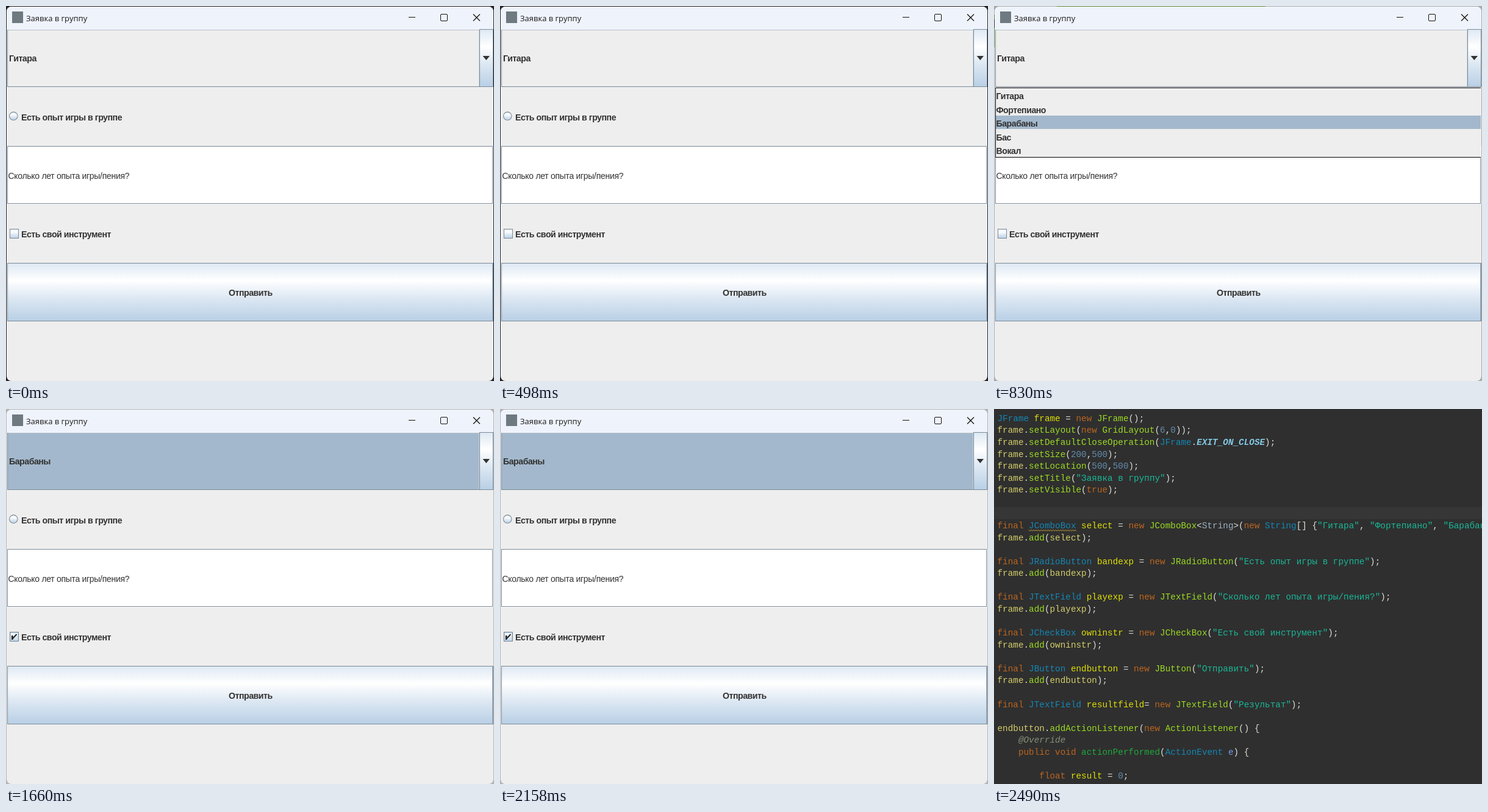
An HTML page with a canvas for the animation above (3.32 s loop, 800 by 616 pixels).

```html
<!DOCTYPE html>
<html lang="ru">
<head>
<meta charset="utf-8">
<style>
  html, body { margin: 0; width: 800px; height: 616px; overflow: hidden; background: #2f2f2f; }
  canvas { display: block; }
</style>
</head>
<body>
<canvas id="stage" width="800" height="616"></canvas>
<script>
const ctx = document.getElementById('stage').getContext('2d');
const STEP = 830;
const BORDER = '#7a8a99', PANEL = '#eeeeee', SELECTED = '#a3b8cc', INK = '#333333';
const BOLD = 'bold 14.2px "Liberation Sans", Arial, sans-serif';
const PLAIN = '14px "Liberation Sans", Arial, sans-serif';
const instruments = ['Гитара', 'Фортепиано', 'Барабаны', 'Бас', 'Вокал'];

function rect(x, y, w, h, fill) {
  ctx.fillStyle = fill;
  ctx.fillRect(x, y, w, h);
}

function outline(x, y, w, h, color) {
  ctx.strokeStyle = color;
  ctx.lineWidth = 1;
  ctx.strokeRect(x + .5, y + .5, w - 1, h - 1);
}

function text(str, x, y, font, color, spacing = 0) {
  ctx.font = font;
  ctx.letterSpacing = spacing + 'px';
  ctx.fillStyle = color;
  ctx.fillText(str, x, y);
}

function label(str, x, y) {
  text(str, x, y, BOLD, INK, -.5);
}

function path(points, color, width) {
  ctx.beginPath();
  points.forEach(([x, y]) => ctx.lineTo(x, y));
  ctx.strokeStyle = color;
  ctx.lineWidth = width;
  ctx.stroke();
}

function metal(y, h) {
  const g = ctx.createLinearGradient(0, y, 0, y + h);
  g.addColorStop(0, '#dde8f3');
  g.addColorStop(.3, '#ffffff');
  g.addColorStop(.6, '#dde8f3');
  g.addColorStop(1, '#b8cfe5');
  return g;
}

function metalBox(x, y, w, h) {
  rect(x, y, w, h, metal(y, h));
  outline(x, y, w, h, BORDER);
}

function desktop(scene) {
  rect(0, 0, 800, 616, ['#252326', '#a9a9a9', '#b4b4b4'][scene]);
  if (scene === 1) {
    rect(0, 14, 1, 54, '#5b8a3c');
    rect(0, 22, 1, 14, '#333333');
  }
}

function titleBar() {
  rect(0, 0, 800, 39, '#eff3fb');
  rect(10, 9, 18, 19, '#6f7a80');
  text('Заявка в группу', 33, 25, '13px "Open Sans", "Noto Sans", sans-serif', '#1a1a1a');
  path([[660, 18.5], [671, 18.5]], '#111', 1);
  ctx.beginPath();
  ctx.roundRect(712.5, 13.5, 11, 11, 1.5);
  ctx.stroke();
  path([[766, 13.5], [777, 24.5]], '#111', 1.2);
  path([[777, 13.5], [766, 24.5]], '#111', 1.2);
}

function comboBox(value, focused) {
  rect(2, 39, 774, 94, focused ? SELECTED : PANEL);
  rect(2, 39, 774, 1, '#b9c2ca');
  rect(2, 39, 1, 94, BORDER);
  rect(2, 132, 797, 1, BORDER);
  rect(775, 40, 1, 92, '#c9d3dc');
  metalBox(776, 38, 23, 95);
  ctx.beginPath();
  ctx.moveTo(781.5, 82);
  ctx.lineTo(793, 82);
  ctx.lineTo(787.3, 89);
  ctx.fillStyle = INK;
  ctx.fill();
  label(value, 5, 91);
}

function radioButton() {
  ctx.beginPath();
  ctx.arc(12.3, 180.8, 6.7, 0, Math.PI * 2);
  ctx.fillStyle = metal(174, 14);
  ctx.fill();
  ctx.strokeStyle = BORDER;
  ctx.lineWidth = 1.1;
  ctx.stroke();
  label('Есть опыт игры в группе', 25, 188);
}

function textField() {
  rect(2, 230, 797, 96, '#ffffff');
  outline(2, 230, 796, 95, BORDER);
  text('Сколько лет опыта игры/пения?', 3.5, 284, PLAIN, INK, -.3);
}

function checkBox(checked) {
  metalBox(6, 366, 15, 16);
  if (checked) {
    outline(7, 367, 13, 14, '#b8cfe5');
    rect(9, 372, 2.5, 7, '#222');
    path([[10.5, 377.5], [17.5, 370]], '#222', 2);
  }
  label('Есть свой инструмент', 25, 380);
}

function popup() {
  rect(2, 134, 796, 115, PANEL);
  rect(2, 134, 796, 1, '#000');
  rect(2, 248, 796, 1, '#000');
  rect(2, 134, 1, 115, '#000');
  rect(3, 180, 795, 22, SELECTED);
  instruments.forEach((name, i) => label(name, 3.5, Math.round(153 + i * 22.5)));
}

function formWindow(scene) {
  desktop(scene);
  ctx.save();
  ctx.beginPath();
  ctx.roundRect(1, 1, 798, 615, 8);
  ctx.clip();
  rect(0, 0, 800, 616, PANEL);
  titleBar();
  comboBox(instruments[scene === 2 ? 2 : 0], scene === 2);
  radioButton();
  textField();
  checkBox(scene === 2);
  metalBox(2, 422, 797, 96);
  rect(797, 423, 1, 94, '#9db0c2');
  label('Отправить', 365, 476);
  if (scene === 1) popup();
  ctx.restore();
  if (scene === 1) rect(103, 0, 342, 1, '#5b8a3c');
}

const source = `JFrame frame = new JFrame();
frame.setLayout(new GridLayout(6,0));
frame.setDefaultCloseOperation(JFrame.EXIT_ON_CLOSE);
frame.setSize(200,500);
frame.setLocation(500,500);
frame.setTitle("Заявка в группу");
frame.setVisible(true);


final JComboBox select = new JComboBox<String>(new String[] {"Гитара", "Фортепиано", "Барабаны", "Бас", "Вокал"});
frame.add(select);

final JRadioButton bandexp = new JRadioButton("Есть опыт игры в группе");
frame.add(bandexp);

final JTextField playexp = new JTextField("Сколько лет опыта игры/пения?");
frame.add(playexp);

final JCheckBox owninstr = new JCheckBox("Есть свой инструмент");
frame.add(owninstr);

final JButton endbutton = new JButton("Отправить");
frame.add(endbutton);

final JTextField resultfield= new JTextField("Результат");

endbutton.addActionListener(new ActionListener() {
    @Override
    public void actionPerformed(ActionEvent e) {

        float result = 0;`.split('\n');

// The first matching rule colours the token.
const rules = [
  [/"[^"]*"/y, '#17c6a3'],
  [/(new|final|true|public|void|float)\b/y, '#cc6c1d'],
  [/@\w+/y, '#8f9a80', 'italic '],
  [/EXIT_ON_CLOSE/y, '#8ddaf8', 'italic bold '],
  [/actionPerformed/y, '#1eb540'],
  [/\w+(?=[(<])/y, '#a7ec21'],
  [/\w+(?=>)/y, '#a9bfd0'],
  [/\w+(?= ?=)/y, '#f2f200'],
  [/[A-Z]\w*/y, '#1290c3'],
  [/\d+/y, '#6897bb'],
  [/e\b/y, '#79abff'],
  [/\w+/y, '#e6df72'],
  [/[^\w"@]+/y, '#f0f1ea']
];

function codeLine(line, y) {
  const charWidth = 8.6;
  let pos = 0;
  while (pos < line.length) {
    for (const [pattern, color, style = ''] of rules) {
      pattern.lastIndex = pos;
      const match = pattern.exec(line);
      if (!match) continue;
      text(match[0], 5.5 + pos * charWidth, y,
        style + '14.33px "Liberation Mono", "Courier New", monospace', color);
      pos += match[0].length;
      break;
    }
  }
}

function editor() {
  rect(0, 0, 800, 616, '#2f2f2f');
  rect(0, 161, 800, 20, '#363636');
  ctx.globalAlpha = .9;
  source.forEach((line, i) => codeLine(line, Math.round(19.9 + i * 19.57)));
  ctx.globalAlpha = 1;
  const squiggle = Array.from({ length: 40 }, (_, i) => [57 + i * 2, i % 2 ? 200.5 : 198.5]);
  path(squiggle, '#c9a83a', 1);
}

let shown = -1;
function tick() {
  const scene = Math.floor(performance.now() / STEP) % 4;
  if (scene !== shown) {
    shown = scene;
    if (scene === 3) editor();
    else formWindow(scene);
  }
  requestAnimationFrame(tick);
}
tick();
</script>
</body>
</html>
```
